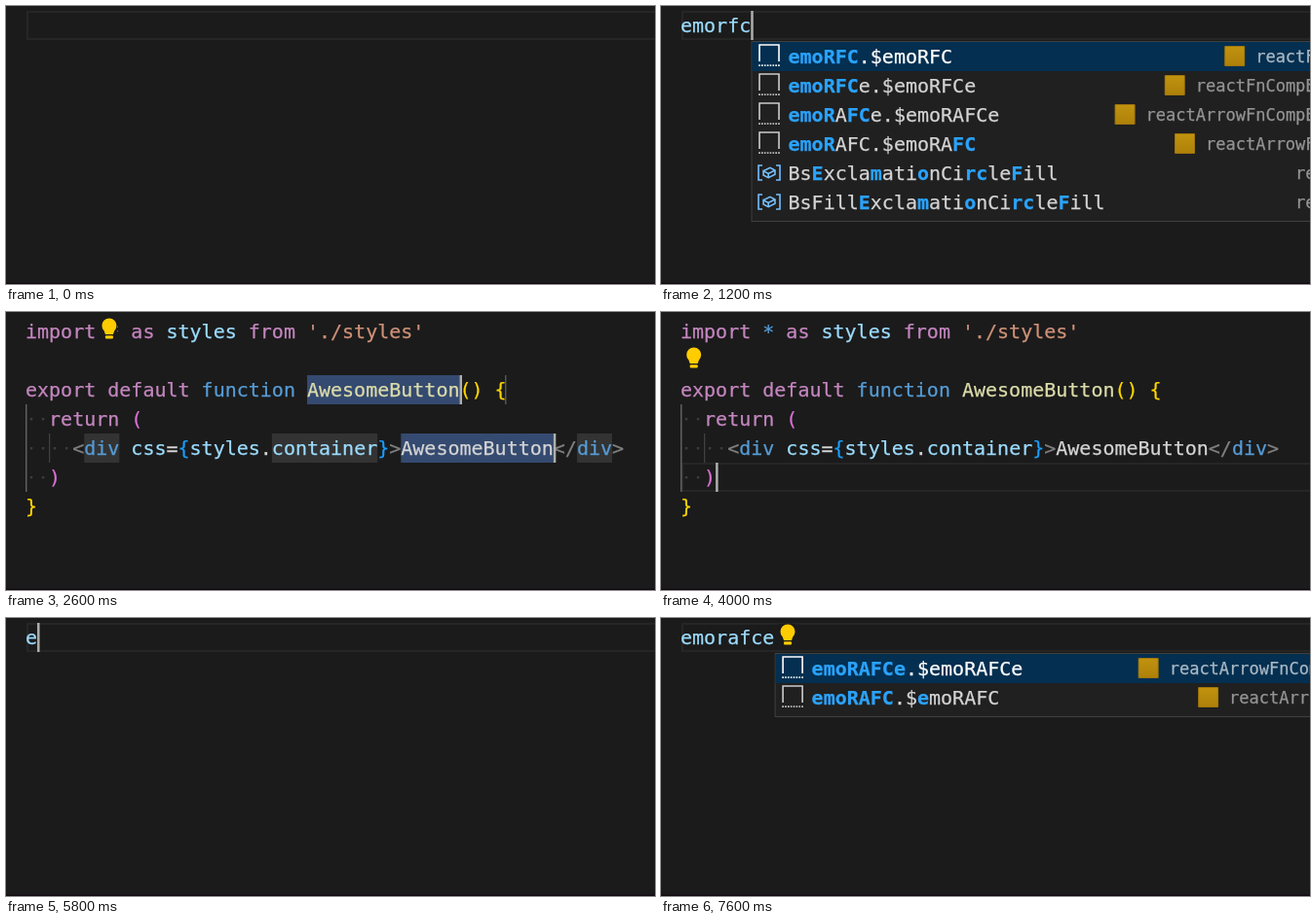
An HTML page with a canvas for the animation above (8 s loop, 666x286 px).

```html
<!DOCTYPE html>
<html lang="en">
<head>
<meta charset="utf-8">
<title>Editor snippets</title>
<style>
  html, body { margin: 0; width: 100%; height: 100%; overflow: hidden; background: #1b1b1b; }
  canvas { display: block; }
</style>
</head>
<body>
<canvas id="stage" width="666" height="286"></canvas>
<script>
const ctx = document.getElementById('stage').getContext('2d');
const FAMILY = '"DejaVu Sans Mono", monospace';
const LOOP = 8000, LEFT = 20, TOP = 5, ROW = 30, CHAR = 12.04, SMALL_CHAR = 10.234;
const BG = '#1b1b1b', BLUE = '#75beff', PURPLE = '#b180d7', CURSOR = '#aeafad';

const colX = col => LEFT + col * CHAR;
const rowY = row => TOP + row * ROW;

function rect(x, y, w, h, color, radius = 0) {
  ctx.fillStyle = color;
  ctx.beginPath();
  ctx.roundRect(x, y, w, h, radius);
  ctx.fill();
}

function line(points, color, width = 1.6) {
  ctx.strokeStyle = color;
  ctx.lineWidth = width;
  ctx.beginPath();
  points.forEach(([x, y]) => ctx.lineTo(x, y));
  ctx.stroke();
}

// A hairline outline gives the slightly heavier strokes of the editor font
function text(str, x, y, color, size = 20, weight = '') {
  ctx.font = `${weight} ${size}px ${FAMILY}`;
  ctx.fillStyle = ctx.strokeStyle = color;
  ctx.lineWidth = 0.25;
  ctx.fillText(str, x, y);
  ctx.strokeText(str, x, y);
}

// Source code: [text, colour] runs for each row
const KEY = '#c586c0', WORD = '#569cd6', NAME = '#9cdcfe', FN = '#dcdcaa',
      PLAIN = '#d4d4d4', TAG = '#808080', GOLD = '#ffd700', PINK = '#da70d6', BRACE = '#179fff';
const CODE = [
  [['import ', KEY], ['* ', WORD], ['as ', KEY], ['styles ', NAME], ['from ', KEY], ["'./styles'", '#ce9178']],
  [],
  [['export default ', KEY], ['function ', WORD], ['AwesomeButton', FN], ['() {', GOLD]],
  [['  return ', KEY], ['(', PINK]],
  [['    <', TAG], ['div ', WORD], ['css', NAME], ['=', PLAIN], ['{', BRACE], ['styles', NAME], ['.', PLAIN],
   ['container', NAME], ['}', BRACE], ['>', TAG], ['AwesomeButton', PLAIN], ['</', TAG], ['div', WORD], ['>', TAG]],
  [['  )', PINK]],
  [['}', GOLD]]
];
const rowLength = row => CODE[row].reduce((sum, [str]) => sum + str.length, 0);

// Completion items: [kind, label, detail]
const snippet = (name, detail, label = `${name}.$${name}`) => ['snippet', label, detail];
const icon = label => ['value', label, 'react-i'];
const RAFC = snippet('emoRAFC', 'reactArrowFnComp');
const RAFCE = snippet('emoRAFCe', 'reactArrowFnCompExport');
const RFC = snippet('emoRFC', 'reactFnComp');
const RFCE = snippet('emoRFCe', 'reactFnCompExport');
const MONITOR = ['field', 'errorMonitor', ''];
const ROUTES = ['method', 'enhance[M]anual[Ro]uteObjects', 'react-router/dist/lib/con'];
const FIRST = [RAFC, RAFCE, RFC, RFCE, MONITOR, MONITOR];
const CIRCLES = [
  RFC, RFCE, RAFCE, snippet('', 'reactArrowFnComp', '[emoR]AFC.$emoRA[FC]'),
  icon('Bs[E]xcla[m]ati[o]nCi[rc]le[F]ill'), icon('BsFill[E]xcla[m]ati[o]nCi[rc]le[F]ill')
];
const TRIANGLES = [
  RAFC, RAFCE, ROUTES, icon('BsEmojiFrownFill'), icon('BsExclamationTriangleFill'),
  icon('BsFillEmojiFrownFill'), icon('BsEmojiNeutralFill'), icon('BsEmojiDizzyFill'), icon('BsEmojiAngryFill')
];
const EMO = [...FIRST, icon('BsEmojiAngry'), icon('BsEmojiAngryFill'), icon('BsEmojiDizzy')];
const LISTS = {
  e: EMO, em: EMO, emo: EMO,
  emor: [...FIRST, ['method', ROUTES[1].replace('e', '[e]'), ROUTES[2]], icon('BsEmojiFrown'), icon('BsEmojiFrownFill')],
  emorf: CIRCLES, emorfc: CIRCLES,
  emora: TRIANGLES, emoraf: TRIANGLES,
  emorafc: [RAFC, RAFCE], emorafce: [RAFCE, RAFC]
};

// Characters with a flag for a match; square brackets in a label mark matches by hand
function matches(label, typed) {
  const manual = label.includes('[');
  let on = false, next = 0;
  const chars = [];
  for (const ch of label) {
    if (ch === '[' || ch === ']') { on = ch === '['; continue; }
    const hit = manual ? on : next < typed.length && ch.toLowerCase() === typed[next];
    if (hit && !manual) next++;
    chars.push([ch, hit]);
  }
  return chars;
}

// Outlined solid: six outer corners, starting at the upper left, around an inner one
function solid(cx, cy, scale, color, corners, inner) {
  const at = ([x, y]) => [cx + x * scale, cy + y * scale];
  const outer = corners.map(at), mid = at(inner);
  line([...outer, outer[0], mid, outer[2]], color);
  line([mid, outer[4]], color);
}
const brick = (cx, cy, scale, color) =>
  solid(cx, cy, scale, color, [[-7, -2], [1, -6], [7, -3], [7, 2], [-1, 6], [-7, 3]], [-1, 1]);
const cube = (cx, cy, scale, color) =>
  solid(cx, cy, scale, color, [[-6, -3.5], [0, -7], [6, -3.5], [6, 3.5], [0, 7], [-6, 3.5]], [0, 0]);

function kindIcon(kind, x, y, color) {
  if (kind === 'snippet') {
    line([[x + 1, y + 20], [x + 1, y + 3], [x + 21, y + 3], [x + 21, y + 20]], color);
    for (let i = 0; i < 8; i++) rect(x + 0.2 + i * 2.85, y + 23.3, 1.6, 1.6, color);
  } else if (kind === 'field') {
    brick(x + 10.7, y + 15, 1.5, BLUE);
  } else if (kind === 'method') {
    cube(x + 10.5, y + 14.5, 1.5, PURPLE);
  } else {
    line([[x + 4, y + 7], [x, y + 7], [x, y + 22], [x + 4, y + 22]], BLUE);
    line([[x + 18, y + 7], [x + 22, y + 7], [x + 22, y + 22], [x + 18, y + 22]], BLUE);
    brick(x + 11, y + 14.5, 0.85, BLUE);
  }
}

function yellowSquare(x, y) {
  const shade = ctx.createLinearGradient(0, y, 0, y + 21);
  shade.addColorStop(0, '#c2930f');
  shade.addColorStop(1, '#ad8009');
  rect(x, y, 21, 21, '#a0760a', 1);
  rect(x + 1, y + 1, 19, 19, shade);
}

function popup(typed) {
  const items = LISTS[typed], x = colX(typed.length) + 0.3, top = 36;
  rect(x, top, 660, items.length * ROW + 6, '#404040');
  rect(x + 1, top + 1, 660, items.length * ROW + 4, '#202020');
  items.forEach(([kind, label, detail], i) => {
    const y = top + 1 + i * ROW, chosen = i === 0;
    if (chosen) rect(x + 1, y, 660, ROW, '#042f50');
    kindIcon(kind, x + 7.5, y, chosen ? '#ffffff' : '#cccccc');
    matches(label, typed).forEach(([ch, hit], n) =>
      text(ch, x + 38 + n * CHAR, y + 22, hit ? '#2aa3fc' : chosen ? '#ffffff' : '#d4d4d4', 20, hit ? 'bold' : ''));
    const detailX = x + 630.2 - detail.length * SMALL_CHAR;
    text(detail, detailX, y + 21, chosen ? '#a9b8c4' : '#949494', 17);
    if (kind === 'snippet') yellowSquare(detailX - 32, y + 4);
  });
}

function bulb(col, row) {
  const x = colX(col) + 13.7, y = rowY(row);
  rect(x - 9, y + 1, 17, 24, BG);
  ctx.fillStyle = '#ffcc00';
  ctx.beginPath();
  ctx.arc(x, y + 9, 7.5, 0.8, Math.PI - 0.8, true);
  ctx.lineTo(x - 4, y + 18);
  ctx.lineTo(x + 4, y + 18);
  ctx.fill();
  rect(x - 4, y + 19.3, 8, 3.2, '#ffcc00', 1);
}

function cursor(col, row) {
  rect(colX(col), rowY(row), 2.5, ROW, CURSOR);
}

function activeLine(row) {
  ctx.strokeStyle = '#262626';
  ctx.lineWidth = 2;
  ctx.strokeRect(22, rowY(row) + 1, 700, ROW - 2);
}

function box(col, row, length, color) {
  rect(colX(col), rowY(row), length * CHAR, ROW, color);
}

function code(selected) {
  if (!selected) rect(20, rowY(3), 1.5, 3 * ROW, '#606060');
  rect(44, rowY(4), 1.3, ROW, '#404040');
  CODE.forEach((runs, row) => {
    let col = 0;
    for (const [str, color] of runs) {
      text(str, colX(col), rowY(row) + 22, color);
      col += str.length;
    }
    const indent = (runs[0]?.[0].match(/^ */) || [''])[0].length;
    for (let i = 0; i < indent; i++)
      rect(colX(i + 0.5) - 1.2, rowY(row) + 14, 2.4, 2.4, selected ? '#446283' : '#3d3d3d');
  });
}

// Scenes
function typing(typed, { list = true, caret = true, light = false } = {}) {
  activeLine(0);
  text(typed, LEFT, 27, NAME);
  if (typed && list) popup(typed);
  if (caret) cursor(typed.length, 0);
  if (light) bulb(typed.length, 0);
}

function placeholders({ tags = true, light = true } = {}) {
  if (tags) {
    box(5, 4, 3, '#333333');
    box(47, 4, 3, '#333333');
  }
  box(21, 4, 9, '#333333');
  box(24, 2, 13, '#354a70');
  box(32, 4, 13, '#354a70');
  code();
  rect(512, rowY(2), 1.5, ROW, '#555555');
  cursor(37, 2);
  cursor(45, 4);
  if (light) bulb(6, 0);
}

function editing(col, row, light = true) {
  activeLine(row);
  code();
  if (row === 2) {
    ctx.strokeStyle = '#888888';
    ctx.lineWidth = 1;
    ctx.strokeRect(colX(40) + 0.5, rowY(2) + 2, CHAR, 24);
    ctx.strokeRect(colX(0) + 2, rowY(6) + 2, CHAR - 1, 23);
  }
  if (light) bulb(0, 1);
  cursor(col, row);
}

function selectAll(caret = true) {
  CODE.forEach((_, row) =>
    rect(LEFT, rowY(row), (rowLength(row) + 1) * CHAR - 2 * (row === 6) + 0.5, ROW, '#21466b',
      [row ? 0 : 5, 5, 5, row === 6 ? 5 : 0]));
  code(true);
  bulb(0, 1);
  if (caret) cursor(0, 7);
}

const empty = () => typing('', { caret: false });
const SCENES = [
  [0, empty],
  [400, () => typing('e')],
  [600, () => typing('emo')],
  [800, () => typing('emor')],
  [1000, () => typing('emorf')],
  [1200, () => typing('emorfc')],
  [1400, () => typing('emorfc', { caret: false })],
  [1600, () => typing('emorfc')],
  [1800, () => typing('emorfc', { light: true })],
  [2000, () => typing('emorfc', { light: true, caret: false })],
  [2200, () => typing('emorfc', { light: true })],
  [2400, () => placeholders({ tags: false })],
  [2600, () => placeholders()],
  [2800, () => placeholders({ light: false })],
  [3000, () => editing(41, 2, false)],
  [3200, () => editing(41, 2)],
  [3600, () => editing(10, 3)],
  [3800, () => editing(41, 4)],
  [4000, () => editing(3, 5)],
  [4200, () => editing(1, 6)],
  [4400, () => editing(0, 7)],
  [4600, () => selectAll()],
  [4800, () => selectAll(false)],
  [5000, () => selectAll()],
  [5200, empty],
  [5800, () => typing('e', { list: false })],
  [6000, () => typing('em')],
  [6200, () => typing('emo')],
  [6400, () => typing('emor')],
  [6600, () => typing('emora')],
  [6800, () => typing('emoraf')],
  [7000, () => typing('emorafc')],
  [7200, () => typing('emorafce')],
  [7400, () => typing('emorafce', { caret: false })],
  [7600, () => typing('emorafce', { caret: false, light: true })]
];

const origin = performance.now();
function render() {
  const time = Math.max(0, performance.now() - origin) % LOOP;
  rect(0, 0, 666, 286, BG);
  SCENES.findLast(([start]) => start <= time)[1]();
  rect(0, 284.7, 666, 1.3, '#120a10');
  requestAnimationFrame(render);
}
render();
</script>
</body>
</html>
```
